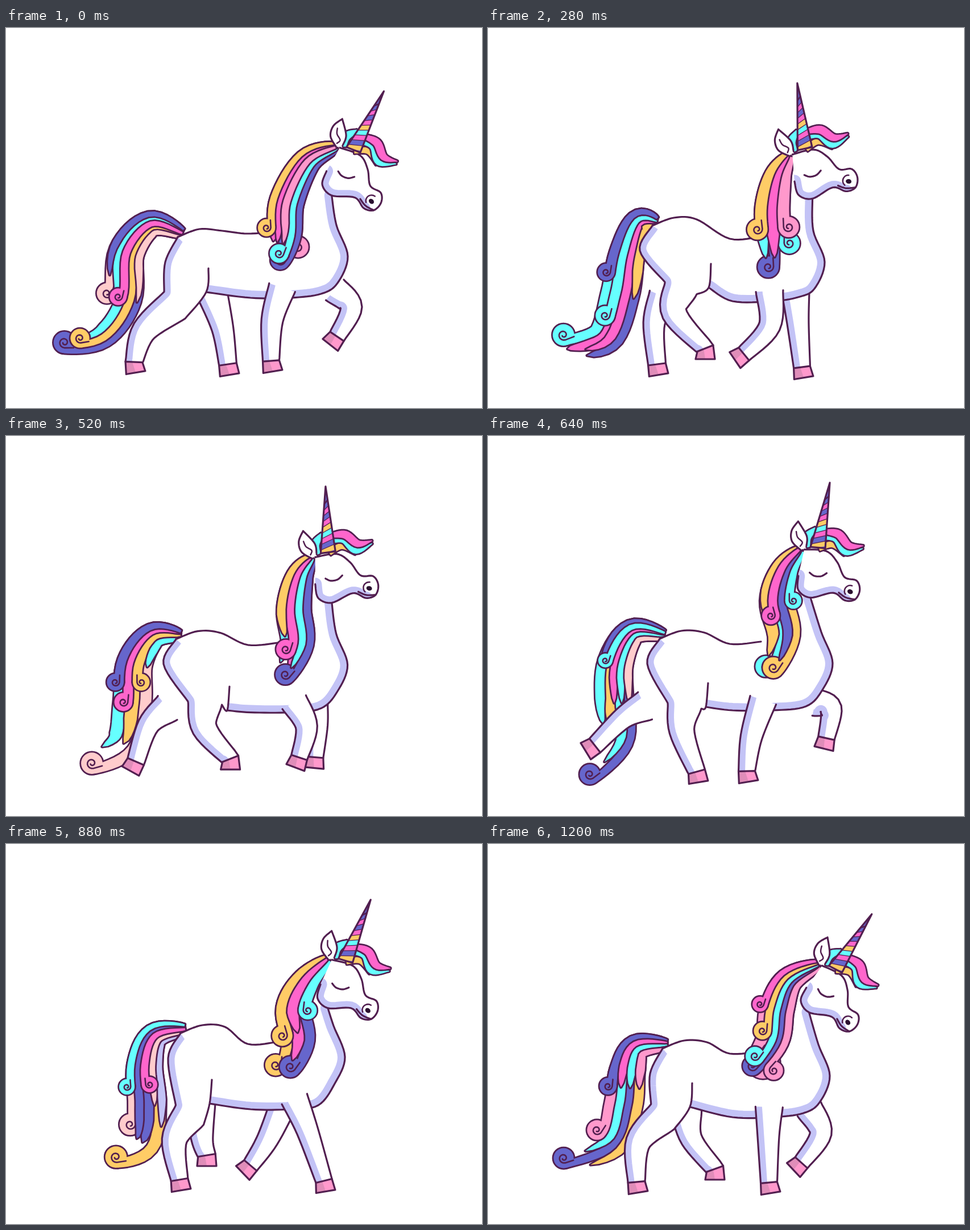
Write an HTML page with a canvas that moves like this. It is 837 px wide and 669 px high and loops after 1.28 s.

```html
<!DOCTYPE html>
<html lang="en">
<head>
<meta charset="utf-8">
<title>Walking unicorn</title>
<style>
  html, body { margin: 0; width: 100%; height: 100%; overflow: hidden; background: #fff; }
  canvas { display: block; width: 837px; height: 669px; }
</style>
</head>
<body>
<canvas id="stage" width="837" height="669"></canvas>
<script>
const ctx = document.getElementById('stage').getContext('2d');
const LOOP = 1280;
const STARTS = [0, 40, 80, 120, 200, 280, 360, 440, 520, 600, 640, 680, 720, 800, 880, 960, 1040, 1120, 1200];
const INK = '#521f50', SHADE = '#c3c3f6', WHITE = '#fff';
const HUE = { B: '#6666cc', C: '#66ffff', P: '#ff66cc', R: '#ff99cc', L: '#ffcccc', G: '#ffcc66', V: SHADE };

// body: rump, withers, chest, flank, belly. head: horn base and tilt in degrees.
// legs: knee and ankle of near hind, far hind, near front, far front.
// tail, mane: spine of the fan. Locks: hue, length in tenths, side of the curl; under layer / top layer.
const POSES = [
  { at: 0, head: '611,214,15', body: '340,354 480,358 601,402 352,465 500,475',
    legs: '243,533 225,588 381,530 390,592 468,515 466,586 607,492 582,543',
    tail: '255,345 212,395 205,475 165,535 100,552', mane: '530,235 494,305 490,365 478,412',
    tailLocks: 'L6< C9 B10</B5 C6 P6< G9< L6', maneLocks: 'P8 B9 R8>/G7< P8 R8 C9< B10<' },
  { at: 80, head: '586,209,0', body: '335,349 480,357 601,400 357,460 500,477',
    legs: '262,533 234,582 368,530 370,594 466,525 456,592 610,500 604,550',
    tail: '250,338 228,395 232,470 205,535 130,545', mane: '520,240 495,300 496,355 490,412',
    tailLocks: 'B9 C10</B4 C5< G9< P6< C6 B6', maneLocks: 'P9 P9 C10>/C6 G7< B10< R7>' },
  { at: 280, head: '557,212,-19', body: '327,334 480,367 592,412 388,457 500,481',
    legs: '328,503 382,564 292,520 297,592 495,525 450,574 545,520 552,597',
    tail: '265,342 244,400 232,470 205,545 140,565', mane: '510,260 500,315 502,365 505,420',
    tailLocks: 'C10< P10 B9/B5< C7< P9 G6', maneLocks: 'C9 B10< C8>/G7< P9 R7>' },
  { at: 440, head: '557,210,-23', body: '335,344 480,365 597,405 393,487 500,489',
    legs: '355,512 413,553 259,518 255,592 572,500 556,550 509,530 509,588',
    tail: '262,356 228,400 222,470 195,545 130,562', mane: '513,255 505,315 507,375 480,430',
    tailLocks: 'C9 G8 L10</B5< P6< G5> C4', maneLocks: 'C9 P9 L8/G7 P8< C9 B10<' },
  { at: 640, head: '580,196,-2', body: '340,343 480,362 606,400 383,477 500,483',
    legs: '341,520 367,591 237,497 188,545 463,530 455,590 603,480 595,532',
    tail: '255,345 224,400 222,470 225,535 175,595', mane: '522,235 508,290 520,350 500,410',
    tailLocks: 'C7 G8 C9 B10</B4 C4< P6 C6 L6', maneLocks: 'G9 C10< G10</G6 P6< B9 C5>' },
  { at: 880, head: '597,205,10', body: '345,319 480,348 596,375 358,457 500,467',
    legs: '296,522 305,591 345,520 353,548 530,505 559,593 460,520 430,566',
    tail: '262,338 244,390 248,460 240,525 190,550', mane: '528,240 505,290 514,345 498,395',
    tailLocks: 'L7< B8 G10</C5< B8 P5> L6 V7', maneLocks: 'G10< P9 B10</G7< P7 C5>' },
  { at: 1200, head: '611,220,21', body: '345,346 480,365 601,408 355,463 500,481',
    legs: '264,525 261,595 358,520 399,572 493,515 494,596 585,510 551,561',
    tail: '262,358 245,400 238,460 215,525 135,560', mane: '530,240 508,290 500,345 468,395',
    tailLocks: 'R8< C9 B10< G9/B5< P5 C5 R5', maneLocks: 'R9>/P5< G7< C9< B10< R9>' }
];

// Swapped for far and front legs; near and far limbs are drawn on the same rule.
const FAR_HIND = [54, 38, 31], NEAR_HIND = [60, 44, 30], FRONT = [48, 38, 29];

const points = s => s.split(' ').map(p => p.split(',').map(Number));
const lerp = (a, b, u) => a.map((v, i) => v + (b[i] - v) * u);
const off = (p, x, y) => [p[0] + x, p[1] + y];
const unit = (x, y) => { const d = Math.hypot(x, y) || 1; return [x / d, y / d]; };

// Catmull-Rom sampling for points of any dimension
function smooth(p) {
  const out = [p[0]];
  for (let i = 0; i < p.length - 1; i++) {
    const a = p[i - 1] || p[i], b = p[i], c = p[i + 1], d = p[i + 2] || c;
    for (let k = 1; k <= 8; k++) {
      const t = k / 8;
      out.push(b.map((v, j) => v + t / 2 * (c[j] - a[j]
        + t * (2 * a[j] - 5 * v + 4 * c[j] - d[j] + t * (3 * v - a[j] - 3 * c[j] + d[j])))));
    }
  }
  return out;
}

// Unit tangent at each point of a polyline
const tangents = line => line.map((p, i) => {
  const a = line[i - 1] || p, b = line[i + 1] || p;
  return unit(b[0] - a[0], b[1] - a[1]);
});

// Shift along the normal, positive to the right of a strand that hangs down
const aside = (p, t, d) => [p[0] + t[1] * d, p[1] - t[0] * d];

function shape(list, closed) {
  const path = new Path2D();
  list.forEach(([x, y]) => path.lineTo(x, y));
  if (closed) path.closePath();
  return path;
}

function fill(path, color) {
  ctx.fillStyle = color;
  ctx.fill(path);
}

function line(path, width = 3.2, color = INK) {
  ctx.strokeStyle = color;
  ctx.lineWidth = width;
  ctx.stroke(path);
}

function shadeEdge(area, edge, width) {
  ctx.save();
  ctx.clip(area);
  line(edge, width, SHADE);
  ctx.restore();
}

// A ribbon along mid, with widths; a curl rolls its end to side -1 or 1
function drawLock(mid, widths, hue, side = 0, r = 0) {
  const tan = tangents(mid), last = mid.length - 1;
  const edge = s => mid.map((p, i) => aside(p, tan[i], s * widths[i] / 2));
  const parts = [shape([...edge(-1), ...edge(1).reverse()], true)];
  let coil;
  if (side) {
    const t = tan[last], w = widths[last];
    const c = aside(mid[last], t, side * (r - w / 2));
    const at = (out, along) => off(aside(c, t, -side * out), t[0] * along, t[1] * along);
    const disc = new Path2D();
    disc.arc(c[0], c[1], r, 0, 7);
    parts.push(disc);
    const gap = Math.max(r - w, r * 0.5);
    const roll = [at(gap, -Math.sqrt(r * r - gap * gap))];
    for (let u = 0; u <= 1; u += 0.05) {
      const q = gap * (1 - 0.75 * u), a = u * 8;
      roll.push(at(q * Math.cos(a), q * Math.sin(a)));
    }
    coil = shape(roll);
  }
  parts.forEach(p => line(p, 5.5));
  parts.forEach(p => fill(p, HUE[hue]));
  if (coil) line(coil, 2.6);
}

// Splits a fan around its spine into equal strands, long ones first
function drawFan(spine, size, layers) {
  const mid = smooth(spine), tan = tangents(mid), count = mid.length - 1;
  layers.split('/').forEach(layer => {
    const locks = layer.split(' ');
    const strands = locks.map((text, i) => ({ text, i, len: parseInt(text.slice(1)) }));
    strands.sort((a, b) => b.len - a.len).forEach(({ text, i, len }) => {
      const end = Math.round(len / 10 * count);
      const side = text.endsWith('<') ? -1 : text.endsWith('>') ? 1 : 0;
      const line = [], widths = [];
      for (let k = 0; k <= end; k++) {
        const spread = size * Math.sin(Math.PI * (0.06 + 0.75 * k / count)) ** 0.8;
        const taper = side ? 1 : Math.min(1, Math.sqrt((end - k) / 5));
        line.push(aside(mid[k], tan[k], spread * ((i + 0.5) / locks.length - 0.5)));
        widths.push(spread / locks.length * taper);
      }
      const w = widths[end];
      drawLock(line, widths, text[0], side, 4 + len + w * 0.35);
    });
  });
}

// rump and crease extend the edges of the near hind leg up into the haunch
function drawLeg(hip, knee, ankle, widths, rump = [], crease = []) {
  const bone = smooth([hip, knee, ankle].map((p, i) => [...p, widths[i]]));
  const tan = tangents(bone), last = bone.length - 1;
  const dx = ankle[0] - knee[0], dy = ankle[1] - knee[1];
  const toe = ankle[1] > 583 ? unit(1, 6) : unit(Math.min(dx, 0) * 1.6, dy);
  tan[last] = unit(tan[last][0] + toe[0], tan[last][1] + toe[1]);
  const edge = s => bone.map((p, i) => aside(p, tan[i], s * p[2] / 2));
  let rear = edge(-1), front = edge(1).reverse();
  const heel = rear[last], tip = front[0];
  if (rump.length) {
    rear = [...smooth([...rump, rear[0]]), ...rear];
    front = [...front, ...smooth([front[last], ...crease])];
  }
  const base = off(ankle, toe[0] * 19, toe[1] * 19);
  const sole = [aside(base, toe, -17), aside(base, toe, 17)];
  const area = shape([...rear, ...sole, ...front], true);
  fill(area, WHITE);
  shadeEdge(area, shape(rear), 23);
  const hoof = shape([heel, ...sole, tip], true);
  fill(hoof, HUE.R);
  fill(shape([heel, sole[0], base, lerp(heel, tip, 0.4)], true), '#e08db9');
  [hoof, shape(rear), shape(front)].forEach(p => line(p));
}

function drawTorso([rump, withers, chest, flank, belly], neck, jaw) {
  const back = smooth([off(rump, -38, 14), rump, off(rump, 40, 3), off(withers, -55, 4), withers]);
  const throat = smooth([jaw, off(chest, -20, -55), chest, off(chest, -18, 47),
    [chest[0] - 47, belly[1] - 7], belly, [430, belly[1]], flank]);
  const area = shape([...back, ...neck, ...throat], true);
  fill(area, WHITE);
  shadeEdge(area, shape(throat), 26);
  line(shape(back));
  line(shape(throat));
}

// The head is one rigid drawing around its horn base
const HORN_BASE = [586, 209], POLL = [556, 212], JAW = [570, 297];
const curve = s => smooth(points(s));
const SKULL = curve('562,212 600,216 619,236 631,263 652,270 657,287 648,303 630,304 610,290 570,297 549,283 550,258');
const MOUTH = curve('648,303 632,299 620,290');
const EYE = curve('570,253 578,259 590,260 600,255');
const EAR = [...curve('556,213 541,197 541,178 553,162'), ...curve('553,162 567,188 566,206')];
const FOLD = curve('549,180 551,190 559,199 555,206');
const FORELOCK = {
  lobe: ['C', '570,208,5 568,190,14 584,176,6'],
  low: ['G', '588,211,9 612,205,10 632,224,3'],
  mid: ['C', '601,192,8 618,196,10 635,218,13 665,214,1'],
  top: ['P', '600,182,8 623,187,14 641,208,12 666,209,1']
};

function drawHorn() {
  const l = [573, 208], r = [599, 211], tip = [611, 96];
  const cone = shape([l, r, tip], true);
  fill(cone, HUE.B);
  ctx.save();
  ctx.clip(cone);
  [...'GBPCGPBPB'].forEach((hue, i) => {
    const cut = k => [lerp(l, tip, k * 0.085 - 0.03), lerp(r, tip, k * 0.085 + 0.03)];
    const [a, b] = cut(i), [c, d] = cut(i + 1);
    fill(shape([a, b, d, c], true), HUE[hue]);
    line(shape([c, d]), 2.5);
  });
  ctx.restore();
  line(cone);
}

function drawHead([x, y, tilt]) {
  ctx.save();
  ctx.translate(x, y);
  ctx.rotate(tilt * Math.PI / 180);
  ctx.translate(-HORN_BASE[0], -HORN_BASE[1]);
  const skull = shape(SKULL, true);
  fill(skull, WHITE);
  shadeEdge(skull, shape(SKULL.slice(56)), 23);
  [SKULL, MOUTH, EYE].forEach(p => line(shape(p)));
  const ring = new Path2D(), hole = new Path2D();
  ring.arc(640, 288, 10, 2.6, 5.1);
  hole.ellipse(640, 289, 5, 4, 0.5, 0, 7);
  line(ring, 2.5);
  fill(hole, '#2b1030');
  for (const [hue, text] of Object.values(FORELOCK)) {
    const mid = curve(text);
    drawLock(mid, mid.map(p => p[2]), hue);
  }
  drawHorn();
  fill(shape(EAR, true), WHITE);
  line(shape(EAR));
  line(shape(FOLD), 2.5);
  ctx.restore();
}

function onHead([x, y, tilt], p) {
  const a = tilt * Math.PI / 180, dx = p[0] - HORN_BASE[0], dy = p[1] - HORN_BASE[1];
  return [x + dx * Math.cos(a) - dy * Math.sin(a), y + dx * Math.sin(a) + dy * Math.cos(a)];
}

function draw(time) {
  const now = STARTS.filter(s => s <= time).pop();
  const k = POSES.filter(p => p.at <= now).length - 1;
  const from = POSES[k], to = POSES[k + 1] || POSES[0];
  const u = (now - from.at) / ((to.at || LOOP) - from.at);
  const { tailLocks, maneLocks } = u < 0.5 ? from : to;
  const blend = name => {
    const end = points(to[name]);
    return points(from[name]).map((p, i) => lerp(p, end[i], u));
  };

  const [head] = blend('head'), body = blend('body'), legs = blend('legs');
  const [rump, , , flank, belly] = body;
  const tail = [off(rump, -30, 7), ...blend('tail')];
  const mane = [onHead(head, POLL), ...blend('mane')];
  const limb = (i, widths, x, pull, lift) => {
    const [knee, ankle] = legs.slice(i * 2);
    drawLeg([x + (knee[0] - x) * pull, belly[1] - lift], knee, ankle, widths);
  };

  ctx.fillStyle = WHITE;
  ctx.fillRect(0, 0, 837, 669);
  ctx.lineJoin = ctx.lineCap = 'round';
  drawFan(tail, 66, tailLocks);
  limb(1, FAR_HIND, 335, 0.6, 8);
  limb(3, FRONT, 535, 0.6, 14);
  drawTorso(body, mane.slice(0, 3).reverse(), onHead(head, JAW));
  const [hock, heel] = legs;
  drawLeg([(hock[0] + 350) / 2, hock[1] - 45], hock, heel, NEAR_HIND,
    [off(rump, -38, 14), off(rump, -60, 58)], [flank, off(flank, 4, -42)]);
  limb(2, FRONT, 495, 0.35, 18);
  drawFan(mane, 60, maneLocks);
  drawHead(head);
}

const begin = performance.now();
function tick() {
  draw((performance.now() - begin) % LOOP);
  requestAnimationFrame(tick);
}
tick();
</script>
</body>
</html>
```
